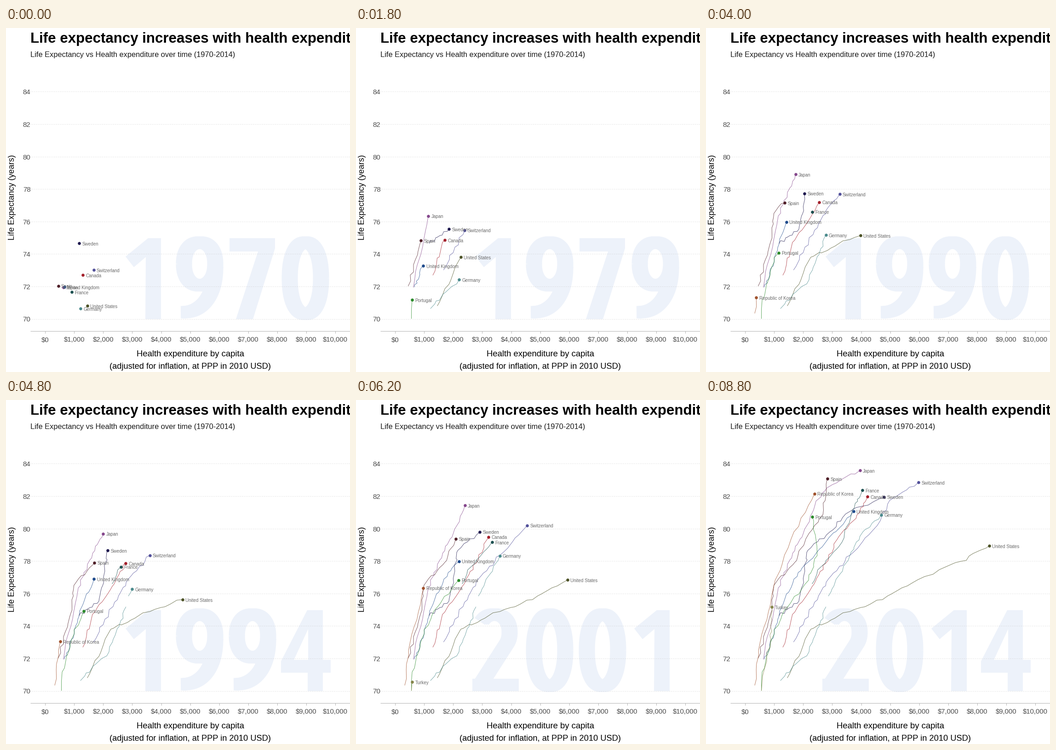
Write a matplotlib script that moves like this. It is 748 px wide and 748 px high and loops after 9500 ms.

```python
import matplotlib.pyplot as plt
import numpy as np
from matplotlib.animation import FuncAnimation
from matplotlib.patches import PathPatch
from matplotlib.path import Path
from matplotlib.transforms import Affine2D

SIZE, DPI = 748, 68
PT = 72 / DPI  # points per pixel
FIRST_YEAR, LAST = 1970, 44
KEY_YEARS = (0, 9, 16, 24, 31, 37, 44)  # years since the first one
YEAR_COLOR = "#edf2fa"

plt.rcParams["font.family"] = "Liberation Sans"
fig = plt.figure(figsize=(SIZE / DPI, SIZE / DPI), dpi=DPI, facecolor="white")
ax = fig.add_axes([0, 0, 1, 1])
ax.set(xlim=(0, SIZE), ylim=(SIZE, 0))
ax.axis("off")


def px_x(spend):
    return 85.2 + 63.1 * np.asarray(spend)


def px_y(life):
    return 632.5 - 35.29 * (np.asarray(life) - 70)


def text(x, y, s, size, color="black", **kw):
    kw.setdefault("va", "baseline")
    return ax.text(x, y, s, fontsize=size * PT, color=color, parse_math=False, **kw)


def rule(xs, ys, color, **kw):
    ax.plot(xs, ys, color=color, lw=PT, solid_capstyle="butt",
            dash_capstyle="butt", zorder=1, **kw)


# ---- Large year numerals, each drawn in a 102 x 182 cell ----

def arc(cx, cy, rx, ry, start=0, stop=360):
    """Slightly squared ellipse arc; angles run clockwise from the right."""
    a = np.radians(np.linspace(start, stop, 60))
    c, s = np.cos(a), np.sin(a)
    return np.column_stack([cx + rx * np.sign(c) * abs(c) ** 0.9,
                            cy + ry * np.sign(s) * abs(s) ** 0.9])


def stroked(*parts):
    """Pen strokes, repeated sideways so verticals come out heavier."""
    return Path.make_compound_path(
        *[Path(np.add(p, (dx, 0))) for p in parts for dx in (-4, 0, 4)]), False


def filled(*parts):
    return Path.make_compound_path(
        *[Path(list(p) + [p[0]], closed=True) for p in parts]), True


six = [arc(51, 122, 34, 46.5), arc(88, 116, 71, 99, 180, 270)]
nine = [np.subtract((102, 182), p) for p in six]
two_bend = arc(46, 52, 33, 38.5, 215, 400)

glyphs = {
    "0": stroked(arc(51, 91, 34, 77.5)),
    "1": filled([(82, 4), (82, 180), (48, 180), (49, 45), (23, 67), (5, 44), (54, 4)]),
    "2": stroked([*two_bend, (18, 162)], [(2, 166.5), (95, 166.5)]),
    "3": stroked(arc(44, 50, 38, 36.5, 230, 450), [(30, 86), (46, 86)],
                 arc(42, 127, 43, 41.5, 270, 485)),
    "4": filled([(55, 4), (89, 4), (89, 112), (106, 112), (106, 140), (89, 140),
                 (89, 180), (56, 180), (56, 140), (-2, 140), (-2, 115)],
                [(57, 45), (26, 112), (57, 112)]),
    "5": stroked([(88, 17.5), (29, 17.5), (25, 86)],
                 arc(42, 122, 44, 46.5, 240, 485)),
    "6": stroked(*six),
    "7": filled([(1, 4), (100, 4), (100, 26), (52, 180), (15, 180), (63, 33), (1, 33)]),
    "8": stroked(arc(51, 49.5, 30, 36), arc(51, 127, 34, 41.5)),
    "9": stroked(*nine),
}

numerals = [ax.add_patch(PathPatch(glyphs["0"][0], zorder=0, capstyle="butt",
                                   joinstyle="miter")) for _ in range(4)]


def show_year(year):
    for i, (patch, digit) in enumerate(zip(numerals, str(year))):
        path, is_fill = glyphs[digit]
        patch.set_path(path.transformed(Affine2D().translate(255 + 115 * i, 453)))
        patch.set_facecolor(YEAR_COLOR if is_fill else "none")
        patch.set_edgecolor("none" if is_fill else YEAR_COLOR)
        patch.set_linewidth(0 if is_fill else 27 * PT)


# ---- Titles and axes ----

text(53, 32, "Life expectancy increases with health expenditure", 31.2, weight="bold")
text(53, 62.5, "Life Expectancy vs Health expenditure over time (1970-2014)", 16.4, "#1a1a1a")
text(400.5, 714, "Health expenditure by capita", 18.5, ha="center")
text(400.5, 741, "(adjusted for inflation, at PPP in 2010 USD)", 18.3, ha="center")
text(22, 368.5, "Life Expectancy (years)", 17.8, rotation=90, ha="right", va="center")

for age in range(70, 85, 2):
    y = float(px_y(age))
    rule([53, SIZE], [y, y], "#c4c4c4", ls=(0, (1, 3)))
    text(53.5, y + 6, str(age), 15, "#4d4d4d", ha="right")

rule([53, SIZE], [658.5, 658.5], "#b3b3b3")
for k in range(11):
    x = float(px_x(k))
    rule([x, x], [658.5, 663.5], "#b3b3b3")
    text(x, 682.5, f"${k * 1000:,}", 14.8, "#4d4d4d", ha="center")


# ---- Country tracks ----

class Track:
    """Spend (thousand USD) and life expectancy at start, key years and end."""

    def __init__(self, name, color, spend, life, start=0, end=LAST, seed=0):
        self.start, self.end = start, end
        inner = [k for k in KEY_YEARS if start < k < end]
        keys = [start, *inner, end] if end > start else [start]
        years = np.arange(start, end + 1)
        # Yearly wobble that leaves the key values untouched
        wobble = np.random.default_rng(seed).uniform(-1, 1, (2, len(years)))
        wobble[:, np.isin(years, keys)] = 0
        self.x = px_x(np.interp(years, keys, spend) + 0.04 * wobble[0])
        self.y = px_y(np.interp(years, keys, life) + 0.1 * wobble[1])
        self.line, = ax.plot([], [], color=color, lw=0.95 * PT, alpha=0.75, zorder=2)
        self.dot, = ax.plot([], [], "o", color=color, ms=6.6 * PT, mew=0, zorder=3)
        self.label = text(0, 0, name, 9.9, "#6b6b6b", zorder=4)

    def show(self, t):
        n = max(0, min(int(t), self.end) - self.start + 1)
        self.line.set_data(self.x[:n], self.y[:n])
        alive = self.start <= t <= self.end
        self.dot.set_visible(alive)
        self.label.set_visible(alive)
        if alive:
            x, y = self.x[n - 1], self.y[n - 1]
            self.dot.set_data([x], [y])
            self.label.set_position((x + 6.3, y + 4.6))


tracks = []


def track(*args, **span):
    tracks.append(Track(*args, seed=len(tracks), **span))


track("Japan", "#85478c", (.63, 1.14, 1.54, 2, 2.4, 2.82, 3.96),
      (71.95, 76.34, 78.07, 79.69, 81.42, 82.51, 83.59))
track("Spain", "#4f1f28", (.45, .89, .99, 1.7, 2.09, 2.68, 2.83),
      (72.03, 74.82, 76.5, 77.9, 79.37, 80.87, 83.08))
track("United Kingdom", "#1f4b8c", (.66, .97, 1.19, 1.68, 2.2, 2.89, 3.73),
      (71.97, 73.27, 74.93, 76.89, 77.99, 79.45, 81.06))
track("Sweden", "#1f1a4f", (1.17, 1.85, 2, 2.155, 2.92, 3.46, 4.79),
      (74.65, 75.53, 76.93, 78.65, 79.8, 80.9, 81.95))
track("Switzerland", "#52509a", (1.67, 2.39, 2.87, 3.605, 4.55, 4.98, 5.97),
      (73.02, 75.46, 76.9, 78.35, 80.19, 81.74, 82.85))
track("Canada", "#a3202b", (1.3, 1.71, 2.31, 2.775, 3.22, 3.82, 4.215),
      (72.7, 74.86, 76.44, 77.86, 79.49, 80.63, 81.96))
track("United States", "#4c5226", (1.455, 2.26, 3.2, 4.73, 5.94, 7.45, 8.41),
      (70.81, 73.8, 74.61, 75.62, 76.84, 77.99, 78.94))

# One survey every five years, then a continuous series
for year in range(0, 20, 5):
    track("France", "#1c5050", [.92 + .07 * year], [71.66 + .243 * year],
          start=year, end=year)
track("France", "#1c5050", (2.31, 2.61, 3.335, 3.685, 4.04),
      (76.6, 77.64, 79.16, 81.11, 82.37), start=20)

# The series breaks for one year
track("Germany", "#4a8a8c", (1.22, 2.2, 2.605, 2.78),
      (70.64, 72.41, 74.33, 75.17), end=20)
track("Germany", "#4a8a8c", (2.87, 2.99, 3.605, 3.955, 4.685),
      (75.85, 76.27, 78.33, 79.53, 80.85), start=22)

track("Portugal", "#2a8a2a", (.56, .585, .93, 1.335, 2.185, 2.48, 2.315),
      (70.02, 71.17, 73.26, 74.92, 76.82, 78.33, 80.72), start=7)
track("Republic of Korea", "#a0522d", (.33, .52, .97, 1.58, 2.385),
      (70.35, 73.04, 76.34, 79.35, 82.15), start=18)
track("Turkey", "#85854a", (.56, .585, .88, .92),
      (70.02, 70.55, 73.18, 75.16), start=30)


def update(frame):
    # Half a year passes per frame; points advance on whole years only.
    t = min(frame / 2, LAST)
    show_year(FIRST_YEAR + int(t))
    for tr in tracks:
        tr.show(t)
    return []


anim = FuncAnimation(fig, update, frames=95, interval=100, repeat=True, repeat_delay=0)
plt.show()
```
